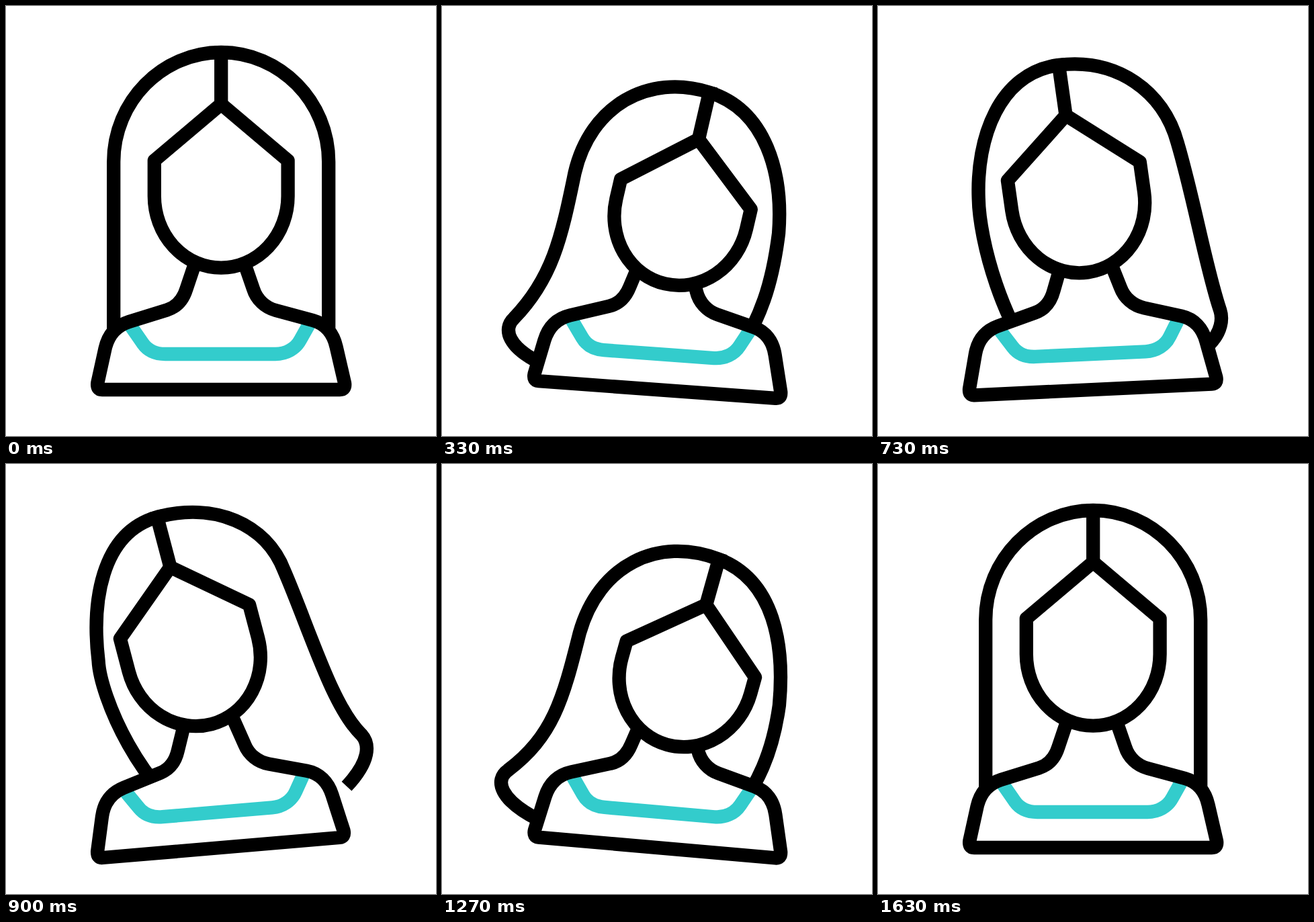
An HTML page for the animation above (2 s loop, 640 by 640 pixels).

```html
<!DOCTYPE html>
<html lang="en">
<head>
<meta charset="utf-8">
<title>Woman tilting her head</title>
<style>
  html, body { margin: 0; width: 100%; height: 100%; overflow: hidden; background: #fff; }
  svg { display: block; width: 100%; height: 100%; }
  .line { fill: none; stroke: #000; stroke-width: 20.3; stroke-linejoin: round; }
</style>
</head>
<body>
<svg viewBox="0 0 640 640">
  <defs>
    <path id="torso" d="M287 366L268.5 421C263.5 437 254 448 239.5 452.5L183 470
      C164 476 152 490 147.5 510L136.3 561Q135 571 143 571H497Q505.500 571 504 561L491.500 507
      C487 487 475 473 457 468L401.500 453C386 449 373 437 368 421L349 366"/>
  </defs>
  <path id="hair" class="line"/>
  <g id="body">
    <use href="#torso" fill="#fff"/>
    <path class="line" style="stroke:#3cc" d="M182 471L203.500 502C211 513 223 518 237 518H401C417 518 431 510 438 497L452 472"/>
    <use href="#torso" class="line"/>
  </g>
  <path id="face" class="line" style="fill:#fff"/>
  <path id="part" class="line"/>
</svg>
<script>
const el = id => document.getElementById(id);

// Hair side, in head space: joint, joint handle, crown handle,
// lock handles, tip, then tip handles and end relative to the tip.
const straight = [-160, -51, 0, -90, -88, 0, 0, 86, 0, -86, -160, 207, 0, 20, 5, 40, 30, 50];
const mirror = side => side.map((v, i) => i % 2 ? v : -v);

// base: body angle, head angle, head x, head y, fringe shift, crown shift
const rest = { base: [0, 0, 320.2, 283, 0, 0], left: straight, right: mirror(straight) };
const toRight = {
  base: [5, 15.7, 363.5, 315, 27.5, 34],
  left: [-170, -18, 0, -105, -97, -9, 3, 103, 50.7, -67, -217.4, 207.5, -15.5, 19, -0.6, 46, 65, 58.6],
  right: [145.2, 5, -16, -88, 88, 8, 7, 51, 57, -97, 100, 230, -20, 0, -20, 0, 40, -25]
};
const toLeft = {
  base: [-5, -15.2, 277.8, 283.5, 1.7, 1.5],
  left: [-138.6, -27.4, 12, -84, -88, 2, -11, 50, -83, -77, -45, 256, 20, 0, 20, 0, -40, -25],
  right: [162.8, -87.7, -8, -75, 88, 0, 14.2, 93.4, -32.5, -50, 213, 178, 9, 17, 3, 42, -42, 70]
};
const keys = [[0, rest], [14, toRight], [26, toLeft], [38, toRight], [49, rest]];

const LOOP = 2000, LAST = 49;

function easeInOut(x) {
  let lo = 0, hi = 1;
  for (let i = 0; i < 24; i++) {
    const t = (lo + hi) / 2, u = 1 - t;
    if (1.26 * t * u * u + 1.74 * t * t * u + t * t * t < x) lo = t; else hi = t;
  }
  return lo * lo * (3 - 2 * lo);
}

function poseAt(step) {
  const i = Math.max(1, keys.findIndex(([at]) => at >= step));
  const [start, a] = keys[i - 1], [end, b] = keys[i];
  const k = easeInOut((step - start) / (end - start));
  const mix = part => a[part].map((v, n) => v + (b[part][n] - v) * k);
  return { base: mix('base'), left: mix('left'), right: mix('right') };
}

function hairSide(s, top) {
  const [jx, jy, hx, hy, cx, cy, ax, ay, bx, by, kx, ky, ...curl] = s;
  return `M0 ${top}C${cx} ${top + cy} ${jx + hx} ${jy + hy} ${jx} ${jy}` +
    `C${jx + ax} ${jy + ay} ${kx + bx} ${ky + by} ${kx} ${ky}c${curl.join(' ')}`;
}

function draw(now) {
  const time = now % LOOP;
  const step = Math.min(LAST, Math.floor((time + 5) * 0.03));
  const { base, left, right } = poseAt(step);
  const [lean, tilt, x, y, fringe, crown] = base;
  const top = crown - 214, brow = fringe - 137, temple = fringe - 53;

  el('body').setAttribute('transform', `rotate(${lean} 320 571)`);
  for (const id of ['hair', 'face', 'part'])
    el(id).setAttribute('transform', `translate(${x} ${y}) rotate(${tilt})`);
  el('hair').setAttribute('d', hairSide(left, top) + hairSide(right, top));
  el('face').setAttribute('d',
    `M0 ${brow}L99.4 ${temple}V0A99.4 106.7 0 0 1 -99.4 0V${temple}Z`);
  el('part').setAttribute('d', `M0 ${brow}V${top - 9.5}`);
}

function tick() {
  draw(performance.now());
  requestAnimationFrame(tick);
}
tick();
</script>
</body>
</html>
```
